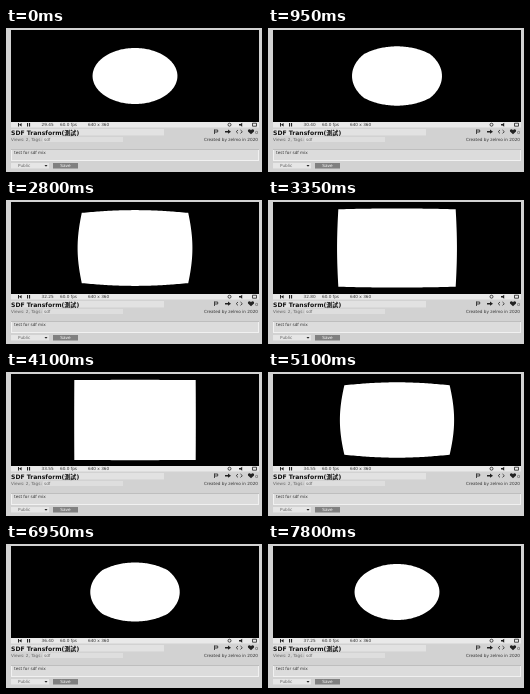
Animation, 256 px wide and 144 px high, one loop 7.85 s. Source, as an HTML page:

```html
<!DOCTYPE html>
<html lang="en">
<head>
<meta charset="utf-8">
<title>SDF Transform</title>
<style>
  html, body { margin: 0; width: 100%; height: 100%; overflow: hidden; background: #d2d2d2; }
  svg { display: block; width: 100vw; height: 100vh; }
  text { font: 4.2px "DejaVu Sans", sans-serif; fill: #333; white-space: pre; }
  .title { font: bold 6.1px "DejaVu Sans", "Noto Sans CJK SC", "Noto Sans CJK", sans-serif; fill: #111; }
  .soft { fill: #666; }
  .end { text-anchor: end; }
  .mid { text-anchor: middle; }
  .icon { fill: #222; }
  .line { fill: none; stroke: #222; stroke-width: .8; }
</style>
</head>
<body>
<svg viewBox="0 0 256 144">
  <rect width="256" height="144" fill="#d2d2d2"/>

  <!-- viewport -->
  <rect x="5" y="2" width="248" height="92"/>
  <path id="shape" fill="#fff"/>

  <!-- player bar -->
  <rect x="5" y="94" width="248" height="5.5" fill="#e9e9e9"/>
  <path class="icon" d="M12 95h1v3.4h-1zM15.6 95v3.4l-2.6-1.7zM21 95h1.1v3.4H21zM23 95h1.1v3.4H23z"/>
  <text id="clock" x="35.6" y="98.3"></text>
  <text x="54" y="98.3">60.0 fps</text>
  <text x="82" y="98.3">640 x 360</text>
  <circle class="line" cx="223.5" cy="96.7" r="1.5"/>
  <path class="icon" d="M233 96h1.5l1.7-1.2v4l-1.7-1.2H233z"/>
  <path class="line" d="M246.5 95.2h4v3h-4z"/>

  <!-- title row -->
  <rect x="5" y="101" width="153" height="6.5" fill="#e2e2e2"/>
  <text class="title" x="5" y="106.5">SDF Transform(測試)</text>
  <path class="line" d="M208.5 101.5v4.5M208.5 102h3.2v2h-3.2"/>
  <path class="icon" d="M219 103h3v-1.4l3 2.1-3 2.1v-1.4h-3z"/>
  <path class="line" d="M232 102l-1.8 1.7 1.8 1.7M234.5 102l1.8 1.7-1.8 1.7"/>
  <path class="icon" d="M245 106.2l-3-2.7q-.7-2 1.2-2.2 1.2 0 1.8 1 .6-1 1.8-1 1.9.2 1.2 2.2z"/>
  <text x="249.2" y="105.7">0</text>

  <!-- details -->
  <text class="soft" x="5" y="112.7">Views: 2, Tags:</text>
  <rect x="37" y="109" width="80" height="5" fill="#dedede"/>
  <text class="soft" x="38" y="112.7">sdf</text>
  <text class="end" x="252" y="112.7">Created by zelmo in 2020</text>

  <!-- description and buttons -->
  <rect x="5.5" y="121.5" width="247" height="11" fill="#dcdcdc" stroke="#f1f1f1"/>
  <path d="M5 121.5h248" stroke="#aaa" stroke-width=".7"/>
  <text x="8" y="125.5">test for sdf mix</text>
  <rect x="5" y="135" width="38" height="5.5" fill="#e6e6e6"/>
  <text class="soft" x="12" y="139.2">Public</text>
  <path class="icon" d="M38.5 137h3l-1.5 1.7z"/>
  <rect x="47" y="135" width="25" height="5.5" fill="#808080"/>
  <text class="mid" x="59.5" y="139.2" style="fill:#fff">Save</text>
</svg>
<script>
  const LOOP = 7850, STEP = 50, START = 29.45;
  const CX = 129, CY = 48, STRETCH = 1.515;
  const RADIUS = 28, HALF = 40.2, POINTS = 240;
  const shape = document.getElementById("shape");
  const clock = document.getElementById("clock");

  // Zero contour of mix(circle distance, box distance, k), solved per angle.
  function outline(k) {
    const size = RADIUS + (HALF - RADIUS) * k;
    const pts = [];
    for (let i = 0; i < POINTS; i++) {
      const a = i / POINTS * 2 * Math.PI;
      const c = Math.cos(a), s = Math.sin(a);
      const r = size / (1 - k + k * Math.max(Math.abs(c), Math.abs(s)));
      pts.push((CX + r * c * STRETCH).toFixed(2) + " " + (CY + r * s).toFixed(2));
    }
    return "M" + pts.join("L") + "Z";
  }

  function draw(now) {
    const t = Math.floor(now % LOOP / STEP) * STEP;
    const k = (1 - Math.cos(2 * Math.PI * t / LOOP)) / 2;
    shape.setAttribute("d", outline(k));
    clock.textContent = (START + t / 1000).toFixed(2);
    requestAnimationFrame(draw);
  }
  draw(performance.now());
</script>
</body>
</html>
```
